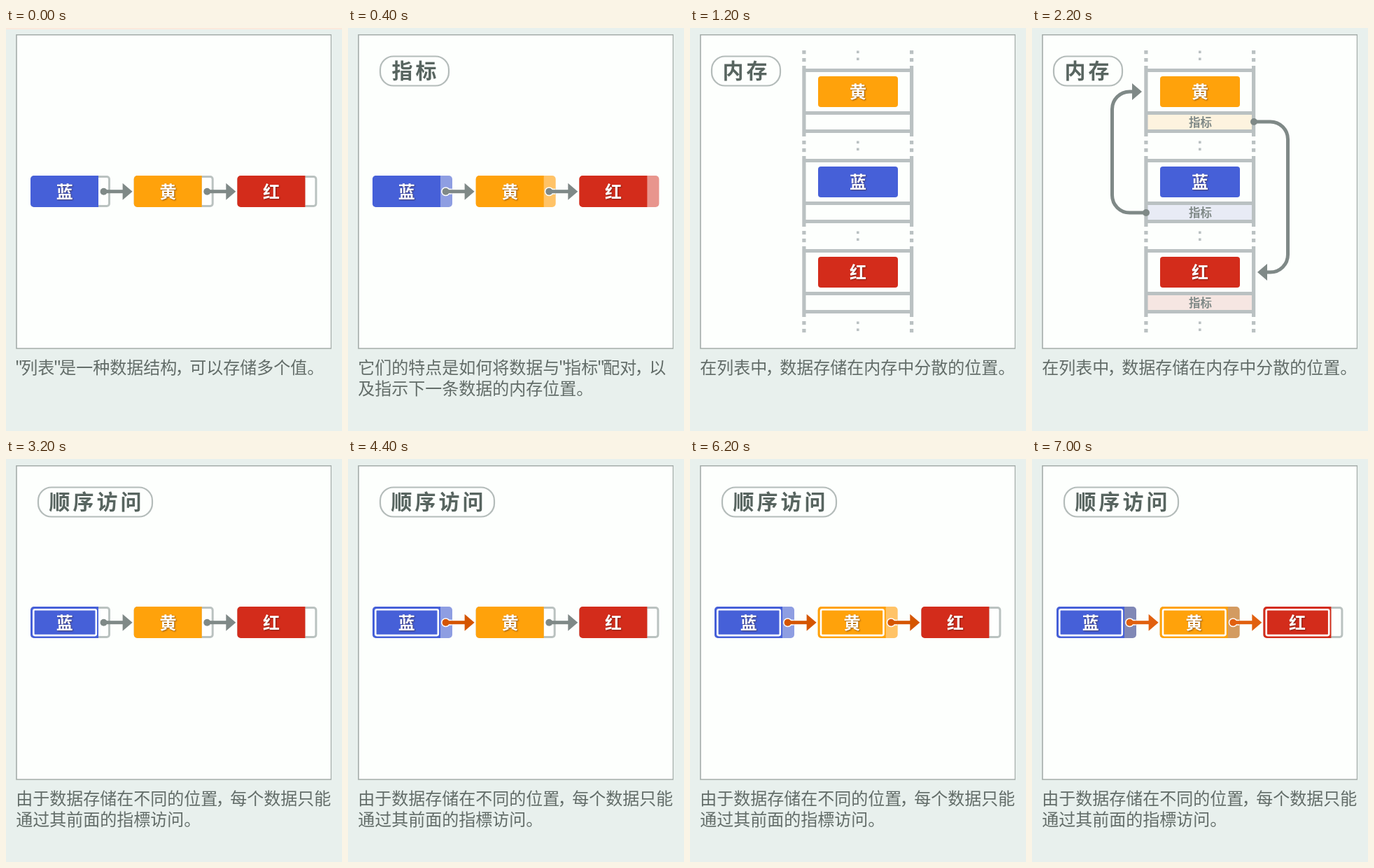
These frames come from a looping animation (480x576 px, 8000 ms). An HTML page with a canvas:

```html
<!DOCTYPE html>
<html lang="zh-CN">
<head>
<meta charset="utf-8">
<style>
  html, body { margin: 0; width: 100%; height: 100%; overflow: hidden; background: #e8f0ed; }
  canvas { display: block; width: 480px; height: 576px; }
</style>
</head>
<body>
<canvas id="stage" width="480" height="576"></canvas>
<script>
const ctx = document.getElementById('stage').getContext('2d');
const LOOP = 8000;
const FONT = '"Noto Sans CJK SC", "Noto Sans CJK", sans-serif';
const GRAY = '#7f8987', RAIL = '#bac1c2';
const BLUE = { name: '蓝', main: '#4660d8', tint: '#8e9ee2', pale: '#e8ebf5' };
const YELLOW = { name: '黄', main: '#ffa20b', tint: '#ffc367', pale: '#fdf3df' };
const RED = { name: '红', main: '#d32c1b', tint: '#e8958d', pale: '#f6e6e2' };
const NODES = [BLUE, YELLOW, RED];
const nodeX = i => 35 + 147.7 * i;

function rect(x, y, w, h, color, radius = 0) {
  ctx.fillStyle = color;
  ctx.beginPath();
  ctx.roundRect(x, y, w, h, radius);
  ctx.fill();
}

function strokeRect(x, y, w, h, color, width, radius) {
  ctx.strokeStyle = color;
  ctx.lineWidth = width;
  ctx.beginPath();
  ctx.roundRect(x, y, w, h, radius);
  ctx.stroke();
}

function disc(x, y, r, color) {
  ctx.fillStyle = color;
  ctx.beginPath();
  ctx.arc(x, y, r, 0, Math.PI * 2);
  ctx.fill();
}

function arrowHead(baseX, tipX, y, color) {
  ctx.fillStyle = color;
  ctx.beginPath();
  ctx.moveTo(baseX, y - 12);
  ctx.lineTo(tipX, y);
  ctx.lineTo(baseX, y + 12);
  ctx.fill();
}

function text(str, x, y, size, weight, color, align = 'left') {
  ctx.font = `${weight} ${size}px ${FONT}`;
  ctx.fillStyle = color;
  ctx.textAlign = align;
  ctx.fillText(str, x, y);
}

// Commas and straight quotes sit tighter than a full square.
function caption(lines) {
  const narrow = { '"': { shift: -1.5, advance: 7 }, '，': { shift: -2.5, advance: 18 } };
  lines.forEach((line, row) => {
    let x = 14.3;
    for (const ch of line) {
      const { shift, advance } = narrow[ch] || { shift: 0, advance: 24 };
      text(ch, x + shift, 493.7 + row * 30.5, 24, 400, '#626c68');
      x += advance;
    }
  });
}

function badge(label, x, width, textX) {
  strokeRect(x + 1, 40.5, width - 2, 42, '#b4bcba', 2.2, 19);
  [...label].forEach((ch, i) => text(ch, textX + i * 34, 71.5, 30, 700, '#586560'));
}

function blockName(name, x, y) {
  ctx.shadowColor = 'rgba(60,30,20,.55)';
  ctx.shadowBlur = 2;
  ctx.shadowOffsetX = ctx.shadowOffsetY = 1;
  text(name, x, y, 24, 700, '#fff', 'center');
  ctx.shadowColor = 'transparent';
}

function listNode(i, cell, selected) {
  const x = nodeX(i), node = NODES[i];
  rect(x, 211, 114, 45, cell || '#bac2c0', 5);
  if (!cell) rect(x + 97, 214, 14, 39, '#fefffe', [0, 2, 2, 0]);
  rect(x, 211, 97, 45, node.main, [5, 0, 0, 5]);
  if (selected) strokeRect(x + 4.3, 215.3, 89.5, 36.8, '#fff', 2.6, 2);
  blockName(node.name, x + 48.7, 242.5);
}

function listArrow(i, color, ring) {
  const x = nodeX(i) + 104.6, y = 233.7;
  if (ring) {
    disc(x, y, 6.5, '#fff');
    rect(x, y - 4, 9, 8, '#fff');
  }
  rect(x, y - 2.5, 28, 5, color);
  disc(x, y, 5, color);
  arrowHead(x + 27, x + 41, y, color);
}

function list({ cells = [], selected = 0, arrows = [] }) {
  NODES.forEach((_, i) => listNode(i, cells[i], i < selected));
  for (let i = 0; i < 2; i++) listArrow(i, arrows[i] || GRAY, cells[i]);
}

function mix(a, b, k) {
  const part = (hex, n) => parseInt(hex.slice(1 + n * 2, 3 + n * 2), 16);
  const channels = [0, 1, 2].map(n => Math.round(part(a, n) + (part(b, n) - part(a, n)) * k));
  return `rgb(${channels})`;
}

function link(x, y, side, endY) {
  const dir = Math.sign(endY - y), r = 25;
  const bendX = x + side * 23.5, farX = bendX + side * r;
  const headX = side < 0 ? 143 : 336;
  ctx.strokeStyle = GRAY;
  ctx.lineWidth = 5;
  ctx.beginPath();
  ctx.moveTo(x, y);
  ctx.lineTo(bendX, y);
  ctx.arcTo(farX, y, farX, y + dir * r, r);
  ctx.lineTo(farX, endY - dir * r);
  ctx.arcTo(farX, endY, bendX, endY, r);
  ctx.lineTo(headX, endY);
  ctx.stroke();
  disc(x, y, 5, GRAY);
  arrowHead(headX, headX - side * 14, endY, GRAY);
}

function memory(linked) {
  const pitch = 129;
  for (let k = 0; k < 4; k++) {
    const top = k * pitch;
    for (const y of [32, 43]) {
      for (const x of [160.3, 314]) rect(x, top + y, 5.2, 5.2, RAIL);
    }
    for (const y of [32.5, 42.5]) rect(238, top + y, 3.6, 3.6, RAIL);
  }
  [YELLOW, BLUE, RED].forEach((node, k) => {
    const top = k * pitch;
    if (linked) {
      rect(165, top + 123, 150, 23, node.pale);
      text('指标', 240.5, top + 140.5, 16.5, 700, GRAY, 'center');
    }
    for (const x of [160.3, 314]) rect(x, top + 54, 5.2, 101, RAIL);
    for (const y of [58, 119, 145]) rect(163, top + y, 154, 5, RAIL);
    rect(183, top + 69, 114, 44, node.main, 4);
    blockName(node.name, 240, top + 100);
  });
  if (linked) {
    link(163, 264, -1, 91);
    link(317, 134, 1, 349);
  }
}

function intro() {
  rect(0, 0, 480, 2, '#fbe9dc');
  list({});
  caption(['"列表"是一种数据结构，可以存储多个值。']);
}

function pointers(t) {
  const glow = Math.min(1, Math.floor((t - 400) / 200) / 2);
  const warm = ['#7b86b8', '#e0a24d', '#e2a24d'];
  badge('指标', 45, 100, 62.5);
  list({ cells: NODES.map((n, i) => mix(n.tint, warm[i], glow)) });
  caption(['它们的特点是如何将数据与"指标"配对，以', '及指示下一条数据的内存位置。']);
}

function scattered(t) {
  badge('内存', 30, 100, 46.5);
  memory(t >= 2200);
  caption(['在列表中，数据存储在内存中分散的位置。']);
}

function sequential(t) {
  const done = t >= 7000;
  const followed = t < 4200 ? 0 : t < 6000 ? 1 : 2;
  const cells = done ? ['#8088b6', '#d39b61'] : [BLUE.tint, YELLOW.tint];
  badge('顺序访问', 45, 165, 61.5);
  list({
    cells: cells.slice(0, followed),
    selected: done ? 3 : t >= 5200 ? 2 : 1,
    arrows: Array(followed).fill(done ? '#e1600f' : '#d55500')
  });
  caption(['由于数据存储在不同的位置，每个数据只能', '通过其前面的指標访问。']);
}

function draw(t) {
  rect(0, 0, 480, 576, '#e8f0ed');
  rect(14.2, 9, 450.8, 449.8, '#a4aca9');
  rect(15.8, 10.4, 448, 446.8, '#fdfffd');
  if (t < 400) intro();
  else if (t < 1200) pointers(t);
  else if (t < 3200) scattered(t);
  else sequential(t);
}

const start = performance.now();
function tick() {
  draw((performance.now() - start) % LOOP);
  requestAnimationFrame(tick);
}
tick();
</script>
</body>
</html>
```
